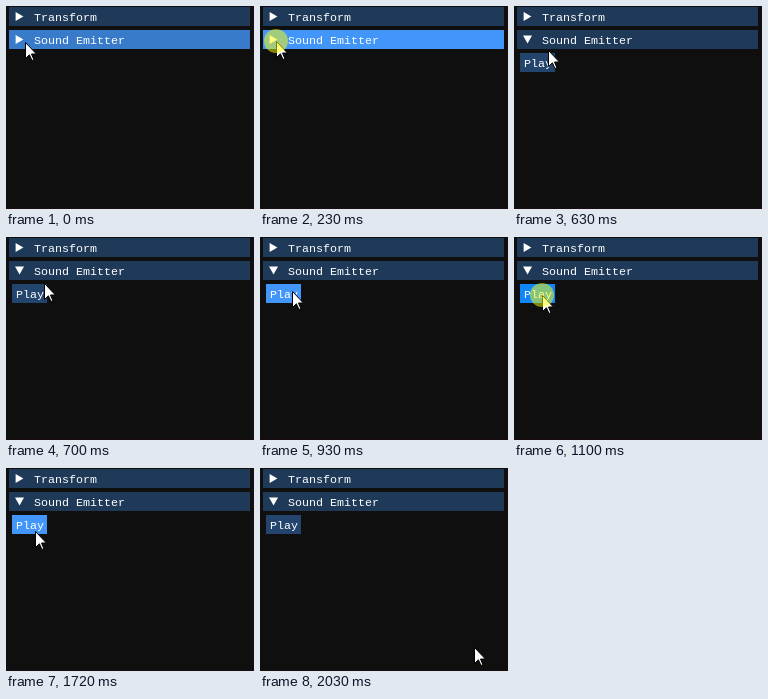
An HTML page that plays this animation: 248x203 px, repeating every 2.11 s.

```html
<!DOCTYPE html>
<html lang="en">
<head>
<meta charset="utf-8">
<title>Component inspector</title>
<style>
  html, body { margin: 0; width: 100%; height: 100%; overflow: hidden; background: #0f0f0f; }
  svg { display: block; width: 248px; height: 203px; }
  text { font: 11.667px "Liberation Mono", "DejaVu Sans Mono", monospace; fill: #fff; white-space: pre; }
  .arrow { fill: #fff; }
</style>
</head>
<body>
<svg viewBox="0 0 248 203">
  <rect width="248" height="203" fill="#0f0f0f"/>
  <path d="M247.5 0V202.5H0" fill="none" stroke="#1a0c10"/>

  <rect x="3" y="1" width="241" height="19" fill="#1f3958"/>
  <path class="arrow" d="M17.4 10.5L9.6 15V6Z"/>
  <text x="28" y="15">Transform</text>

  <rect id="header" x="3" y="24" width="241" height="19"/>
  <path id="arrow" class="arrow"/>
  <text x="28" y="38">Sound Emitter</text>

  <g id="body">
    <rect id="button" x="6" y="47" width="35" height="19"/>
    <text x="10" y="61">Play</text>
  </g>

  <path id="cursor" d="M.5 .5V16.5L4.4 12.8L7 18.5L8.9 17.7L6.5 12H11.4Z"
        fill="#fff" stroke="#000" stroke-linejoin="round"/>
  <circle id="press" r="12" fill="#ff0" fill-opacity=".5"/>
</svg>
<script>
const LOOP = 2110;
const OPEN_AT = 310;
const PRESSES = [[230, 310], [1100, 1170]];

// Pointer samples: time, x, y
const POINTER = [
  [0, 19, 36], [80, 16, 35], [380, 16, 34],
  [460, 19, 35], [540, 26, 39], [620, 34, 44], [700, 38, 46],
  [780, 36, 49], [860, 32, 54], [940, 29, 57], [1020, 28, 58],
  [1490, 28, 63], [1720, 29, 63],
  [1800, 62, 85], [1880, 130, 128], [1950, 192, 165], [2030, 214, 179]
];

const RIGHT = "M17.4 33.5L9.6 38V29Z";
const DOWN = "M13.5 37.4L9 29.6H18Z";
const HEADER = { idle: "#1f3958", hover: "#387bcb", active: "#4296fa" };
const BUTTON = { idle: "#23456d", hover: "#4296fa", active: "#0f87fa" };

const $ = id => document.getElementById(id);
const [header, arrow, body, button, cursor, press] =
  ["header", "arrow", "body", "button", "cursor", "press"].map($);

const set = (node, attrs) => {
  for (const name in attrs) node.setAttribute(name, attrs[name]);
};

const show = (node, visible) =>
  set(node, { visibility: visible ? "visible" : "hidden" });

function stateOf(node, x, y, pressed) {
  const [left, top, width, height] =
    ["x", "y", "width", "height"].map(name => +node.getAttribute(name));
  const inside = x >= left && x < left + width && y >= top && y < top + height;
  return !inside ? "idle" : pressed ? "active" : "hover";
}

function draw(t) {
  const [, x, y] = POINTER.findLast(sample => sample[0] <= t);
  const pressed = PRESSES.some(([from, to]) => t >= from && t < to);
  const open = t >= OPEN_AT;

  set(header, { fill: HEADER[stateOf(header, x, y, pressed)] });
  set(button, { fill: BUTTON[stateOf(button, x, y, pressed)] });
  set(arrow, { d: open ? DOWN : RIGHT });
  set(cursor, { transform: `translate(${x} ${y})` });
  set(press, { cx: x, cy: y });
  show(body, open);
  show(press, pressed);
}

const start = performance.now();

function tick() {
  draw((performance.now() - start) % LOOP);
  requestAnimationFrame(tick);
}

tick();
</script>
</body>
</html>
```
